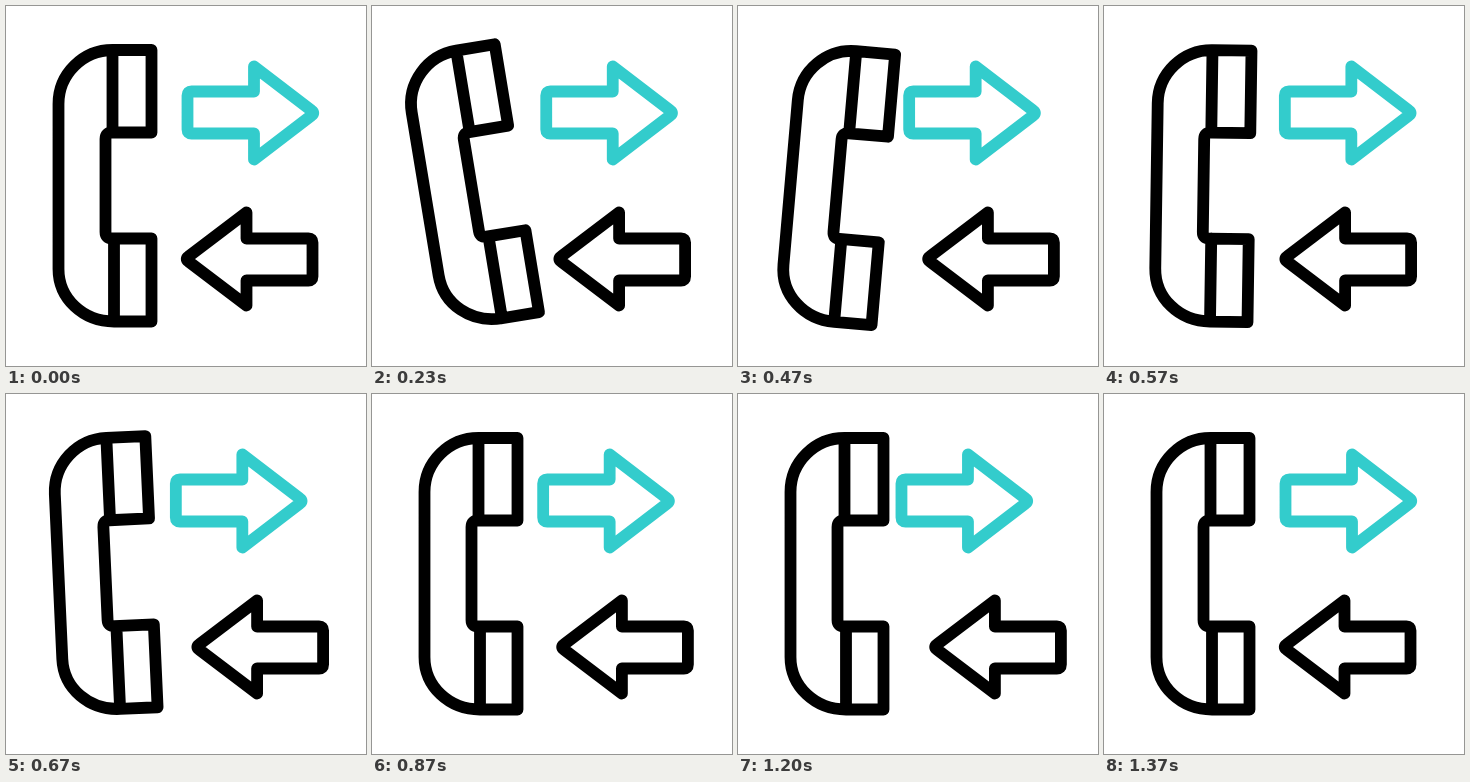
An HTML page that plays this animation: 360x360 px, repeating every 1.7 s.

```html
<!DOCTYPE html>
<html lang="en">
<head>
<meta charset="utf-8">
<title>Call exchange</title>
<style>
  html, body { margin: 0; width: 100%; height: 100%; overflow: hidden; background: #fff; }
  svg { display: block; width: 100%; height: 100%; }
  path { fill: none; stroke: #000; stroke-width: 11.8; stroke-linecap: round; stroke-linejoin: round; }
  #outgoing { stroke: #33cccc; }
</style>
</head>
<body>
<svg viewBox="0 0 360 360">
  <path id="phone" d="M106.500 44H145.500V126.500H106Q99.500 126.500 99.500 133V226Q99.500 232.500 106 232.500H145.500V315.500H108C77 315.500 52.500 292.500 52.500 263V98C52.500 68 77 44 106.500 44V126.500M108 232.500V315.500"/>
  <path id="outgoing" d="M185.500 85.500H248V60.500L305.500 104.500Q309 107 305.500 109.500L248 153.500V127.500H185.500Q181.500 127.500 181.500 123.500V89.500Q181.500 85.500 185.500 85.500Z"/>
  <path id="incoming" d="M302.500 232.500H240.500V206.500L182.500 250.500Q179 253 182.500 255.500L240.500 299.500V274.500H302.500Q306.500 274.500 306.500 270.500V236.500Q306.500 232.500 302.500 232.500Z"/>
</svg>
<script>
  const LOOP = 1700, START = 165, BEAT = 200, SWINGS = 6;
  // Phone angles one beat apart; the first swing is entered halfway through.
  const ANGLES = [10.9, -10.9, 5, -2.6, 0];
  const [phone, outgoing, incoming] =
    ["phone", "outgoing", "incoming"].map(id => document.getElementById(id));

  function phoneAngle(beats) {
    const pos = beats + 0.5, i = Math.floor(pos);
    if (beats <= 0 || i >= ANGLES.length - 1) return 0;
    const eased = (1 - Math.cos(Math.PI * (pos - i))) / 2;
    return ANGLES[i] + (ANGLES[i + 1] - ANGLES[i]) * eased;
  }

  function arrowShift(beats) {
    if (beats <= 0 || beats >= SWINGS) return 0;
    return 1 - Math.abs(beats % 2 - 1);
  }

  function draw() {
    const beats = (performance.now() % LOOP - START) / BEAT;
    const shift = arrowShift(beats);
    phone.setAttribute("transform", `rotate(${phoneAngle(beats)} 99 180)`);
    outgoing.setAttribute("transform", `translate(${-22 * shift} 0)`);
    incoming.setAttribute("transform", `translate(${20 * shift} 0)`);
    requestAnimationFrame(draw);
  }
  draw();
</script>
</body>
</html>
```
